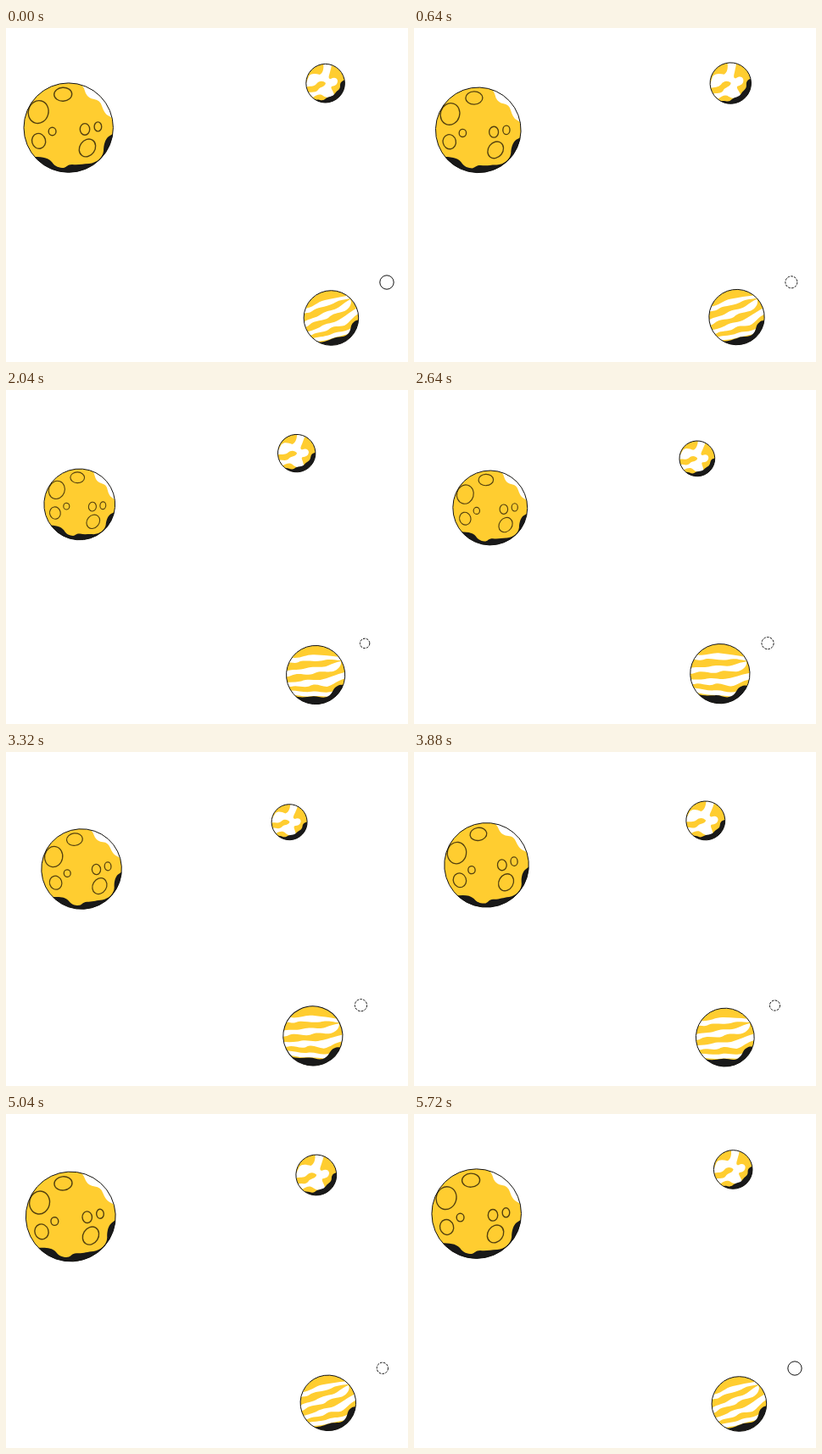
An HTML page for the animation above (5.76 s loop, 474x394 px).

```html
<!DOCTYPE html>
<html lang="en">
<head>
<meta charset="utf-8">
<title>Drifting planets</title>
<style>
html, body { margin: 0; width: 100%; height: 100%; overflow: hidden; background: #fff; }
svg { display: block; width: 474px; height: 394px; }
.body { fill: #ffcd30; }
.light { fill: #fff; }
.shade { fill: #191919; }
.rim { fill: none; stroke: #111; stroke-width: 1; vector-effect: non-scaling-stroke; }
.crater ellipse { fill: none; stroke: #54410f; stroke-width: 1.4; }
</style>
</head>
<body>
<svg viewBox="0 0 474 394">
  <defs>
    <clipPath id="clipBig"><circle cx="73.7" cy="117.6" r="52.7"/></clipPath>
    <clipPath id="clipSmall"><circle cx="376.6" cy="65.2" r="22.8"/></clipPath>
    <clipPath id="clipStriped"><circle cx="383.4" cy="342" r="32.3"/></clipPath>
  </defs>

  <g id="big">
    <g clip-path="url(#clipBig)">
      <circle class="body" cx="73.7" cy="117.6" r="52.7"/>
      <path class="light" d="M86 63Q92 69 94 77Q97 83 104 84Q111 85 113 92Q116 101 120 103Q124 105 128 109V60Z"/>
      <path class="shade" d="M30 152C40 152 49 152 54 158C58 164 63 165 68 165C72 164 72 161 78 161C86 162 90 160 98 160C107 159 114 153 115 145C115 138 117 131 121 128Q124 126 129 123V174H30Z"/>
      <g class="crater">
        <ellipse cx="67.2" cy="78.2" rx="10.5" ry="8" transform="rotate(-3 67 78)"/>
        <ellipse cx="38.2" cy="99" rx="11.8" ry="13.5" transform="rotate(15 38 99)"/>
        <ellipse cx="38.5" cy="133.5" rx="8" ry="9" transform="rotate(-15 38 133)"/>
        <ellipse cx="54.6" cy="122" rx="4.4" ry="4.8"/>
        <ellipse cx="93" cy="119.4" rx="5.7" ry="6.8"/>
        <ellipse cx="108.4" cy="116.4" rx="4.3" ry="5.5"/>
        <ellipse cx="96.2" cy="141.4" rx="9" ry="11" transform="rotate(35 96 141)"/>
      </g>
    </g>
    <circle class="rim" cx="73.7" cy="117.6" r="52.7"/>
  </g>

  <g id="small">
    <g clip-path="url(#clipSmall)">
      <circle class="body" cx="376.6" cy="65.2" r="22.8"/>
      <path class="light" d="M374 41C375 47 374 53 370 55C365 54 360 53 357 57L352 70C358 68 362 70 366 66C369 62 374 62 377 65C376 70 370 69 368 73C365 77 361 75 356 76L362 82C366 79 370 77 374 80C378 83 386 83 387 79C386 74 382 71 384 69C388 68 391 67 391 62C390 58 386 58 383 60C379 60 381 56 382 52C383 48 384 46 384 41Z"/>
      <path class="shade" d="M363 85C370 83 372 87 376 84C380 80 385 82 388 77C391 73 394 73 394 68C394 64 396 62 401 61L403 90L366 92Z"/>
    </g>
    <circle class="rim" cx="376.6" cy="65.2" r="22.8"/>
  </g>

  <g id="striped">
    <g clip-path="url(#clipStriped)">
      <circle class="body" cx="383.4" cy="342" r="32.3"/>
      <path class="light" d="M350 331C362 331 366 323 376 321C386 319 394 317 402 316L406 319C396 321 392 321 386 325C376 330 366 329 361 334C357 337 354 335 350 338Z"/>
      <path class="light" d="M349 348C358 342 364 343 371 338C380 332 386 334 393 329C398 325 402 322 406 320C409 325 404 332 399 334C390 337 386 336 380 342C374 346 364 344 358 350C355 353 352 353 350 354Z"/>
      <path class="light" d="M352 359C358 358 364 356 370 353C378 347 386 349 393 344C400 340 404 336 414 330L416 337C408 341 406 347 399 351C392 353 386 350 380 356C374 360 366 358 361 362L355 364Z"/>
      <path class="light" d="M362 366C370 364 378 364 384 361C392 357 398 360 407 354L404 361C396 363 390 364 382 367C376 369 370 369 366 370Z"/>
      <path class="shade" d="M366 371C376 371 380 368 386 366C392 363 398 366 403 361C408 356 405 351 410 347C412 345 414 344 419 345V376L370 378Z"/>
    </g>
    <circle class="rim" cx="383.4" cy="342" r="32.3"/>
  </g>

  <circle id="moon" class="rim"/>
</svg>
<script>
const LOOP = 5760, STEP = 40;
const byId = id => document.getElementById(id);

// Periodic smooth curve through [time, value] points.
function curve(points) {
  const n = points.length;
  const at = i => {
    const turn = Math.floor(i / n), [t, v] = points[i - turn * n];
    return [t + turn * LOOP, v];
  };
  const slope = i => {
    const a = at(i - 1), b = at(i + 1);
    return (b[1] - a[1]) / (b[0] - a[0]);
  };
  return t => {
    let i = 0;
    while (i < n - 1 && points[i + 1][0] <= t) i++;
    const [t0, v0] = at(i), [t1, v1] = at(i + 1);
    const d = t1 - t0, u = (t - t0) / d, w = 1 - u;
    return v0 * (1 + 2 * u) * w * w + v1 * (3 - 2 * u) * u * u
      + d * u * w * (slope(i) * w - slope(i + 1) * u);
  };
}

// Eased 0 -> 1 -> 0 over one loop.
function swing(t) {
  const u = 1 - Math.abs(1 - 2 * t / LOOP);
  return u * u * (3 - 2 * u);
}

const bigRadius = curve([[0, 52.7], [640, 50.3], [1400, 44.7], [2040, 41.9], [3320, 47.3], [4440, 52], [5000, 52.9]]);
const bigAngle = curve([[0, 0], [640, 2], [1400, 4.6], [2040, 4.8], [3320, -3.8], [4440, -5.4]]);
const smallX = curve([[0, 376.6], [640, 373.3], [1400, 358], [2040, 342.7], [2800, 332.5], [3320, 334.1], [4440, 354.6]]);
const smallY = curve([[0, 65.2], [640, 65.1], [1400, 68], [2040, 74.6], [2700, 81.3], [3320, 82.7], [4440, 77.7]]);
const smallRadius = curve([[0, 22.8], [640, 24.2], [1400, 24.5], [2040, 22.2], [2700, 20.8], [3320, 21], [4440, 24.5]]);
const smallAngle = curve([[0, 0], [640, -3], [1400, 3], [2040, 7], [3320, 9], [4440, 5]]);
const moonRadius = curve([[0, 8.2], [640, 7], [1400, 5.3], [2040, 5.7], [2880, 7.5], [3320, 7.1], [4440, 5.5]]);

function planet(id) {
  const group = byId(id), rim = group.querySelector('.rim');
  const [cx, cy, r] = ['cx', 'cy', 'r'].map(name => +rim.getAttribute(name));
  return (x, y, radius, angle) => group.setAttribute('transform',
    `translate(${x} ${y}) rotate(${angle}) scale(${radius / r}) translate(${-cx} ${-cy})`);
}

const placeBig = planet('big'), placeSmall = planet('small'), placeStriped = planet('striped');
const moon = byId('moon');

function draw(t) {
  const s = swing(t);
  placeBig(73.7 + 16.4 * s, 117.6 + 21.8 * s, bigRadius(t), bigAngle(t));
  placeSmall(smallX(t), smallY(t), smallRadius(t), smallAngle(t));
  placeStriped(383.4 - 23 * s, 342 - 7.5 * s, 32.3 + 2.9 * s, 20 * s);

  const r = moonRadius(t);
  moon.setAttribute('cx', 449 - 32.6 * s);
  moon.setAttribute('cy', 300 - 1.4 * s);
  moon.setAttribute('r', r);
  moon.setAttribute('stroke-dasharray', r > 8 ? 'none' : '2.8 1.2');
}

const start = performance.now();
function tick() {
  const elapsed = (performance.now() - start) % LOOP;
  draw(Math.floor(elapsed / STEP) * STEP);
  requestAnimationFrame(tick);
}
draw(0);
requestAnimationFrame(tick);
</script>
</body>
</html>
```
